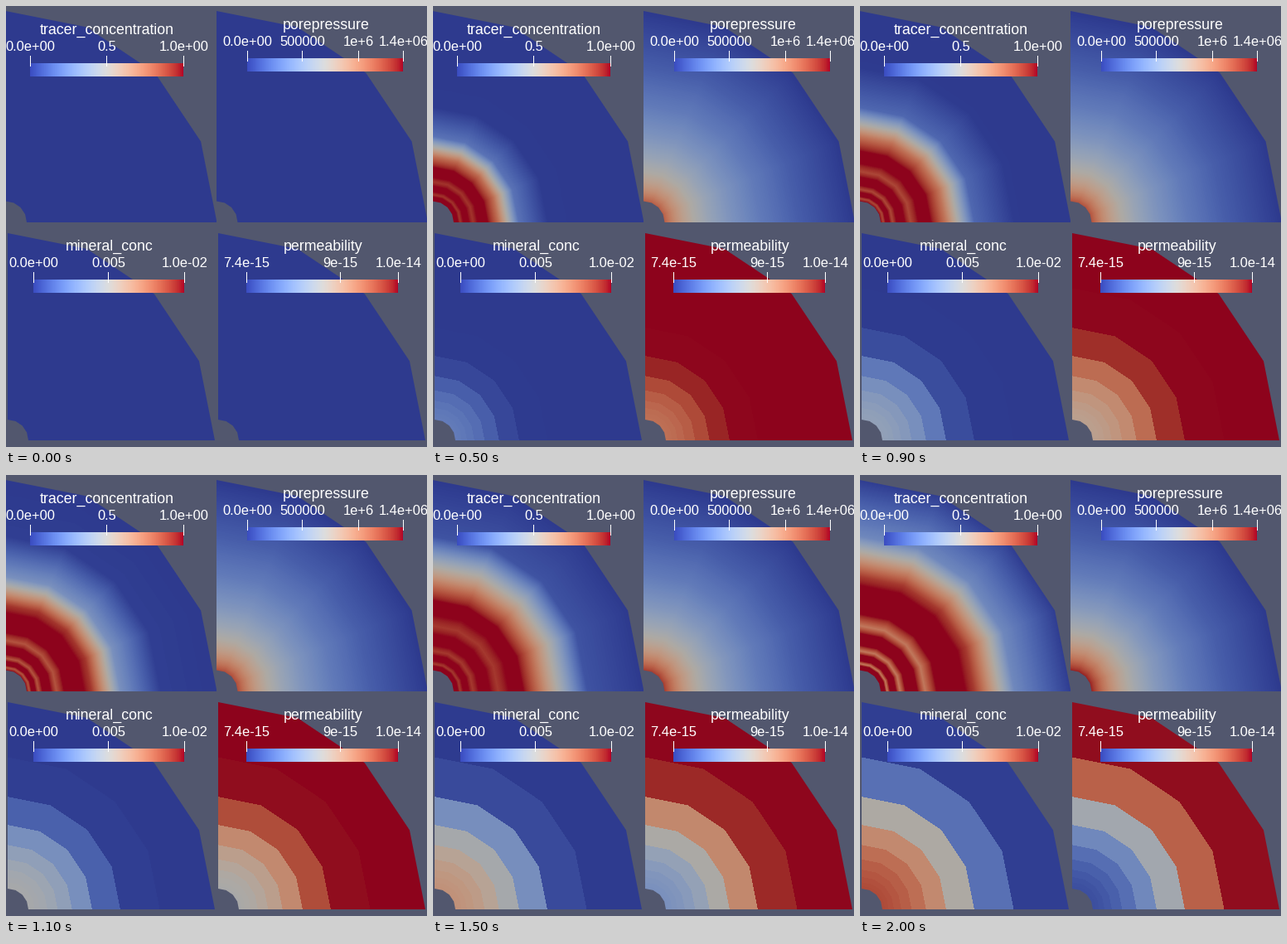
A matplotlib script for the animation above (2.1 s loop, 508 px wide and 532 px high).

```python
import numpy as np
import matplotlib.pyplot as plt
from matplotlib.animation import FuncAnimation

W, H, DPI = 508, 532, 100
FRAMES, INTERVAL = 21, 100
BACK = np.array([82, 87, 110]) / 255
LIGHT = np.array([.785, .768, .742])  # slightly warm lamp
CMAP = plt.get_cmap("coolwarm")

# Ring radii of the mesh, growing by 1.4 from the hole to the rim (rim = 1)
RINGS = 10
NODE = np.arange(RINGS + 1)
EDGES = 0.1 + 0.9 * (1.4 ** NODE - 1) / (1.4 ** RINGS - 1)
MID = (EDGES[1:] + EDGES[:-1]) / 2


def tracer(t):
    # A front whose swept area grows steadily
    front = np.sqrt(0.018 + 0.0208 * t)
    s = EDGES / front - 1
    v = 1.2 / (1 + np.exp(8.5 * (s + 0.04)))
    # Behind it, neighbouring nodes swing against each other
    swing = 0.013 * t * np.tanh(2.5 * np.cos(2 * np.pi * (t - 11) / 14.5))
    behind = np.clip((-s - 0.3) / 0.15, 0, 1)
    v += behind * (0.99 + swing * (-1.0) ** NODE - v)
    v[0] = 1
    return v


def mineral(t):
    # Steady growth with a soft start, later for outer rings
    onset = 47.4 * MID ** 2.3
    soft = 0.3 + 0.14 * onset
    return 0.044 * soft * np.log1p(np.exp((t - onset) / soft))


def permeability(t):
    m = mineral(t)
    return 1 - 1.13 * m + 0.06 * m ** 2


def pressure(t):
    # Steady radial flow: each ring adds its own resistance
    k = 0.74 + 0.26 * permeability(t)
    drop = np.diff(np.log(EDGES)) / k / np.log(10)
    p = np.append(np.cumsum(drop[::-1])[::-1], 0)
    return 0.8 * (1 - np.exp(-1.3 * t)) * p


class Panel:
    def __init__(self, box, centre, radius, values, smooth):
        x0, y0, x1, y1 = box
        self.area = np.s_[y0:y1, x0:x1]
        self.values, self.smooth = values, smooth
        y, x = np.mgrid[y0:y1, x0:x1] + 0.5
        x, y = x - centre[0], centre[1] - y
        # Polygonal radius: constant along the straight side of each sector
        step = np.pi / 8
        off = np.mod(np.arctan2(y, x), step) - step / 2
        s = np.hypot(x, y) * np.cos(off) / np.cos(step / 2)
        cover = np.clip(radius - s + .5, 0, 1) * np.clip(s - radius / 10 + .5, 0, 1)
        self.cover = (cover * (x >= 0) * (y >= 0))[..., None]
        self.rho = s / radius
        self.cell = np.clip(np.searchsorted(EDGES, self.rho) - 1, 0, RINGS - 1)

    def paint(self, img, t):
        v = self.values(t) * (t > 0)  # every field starts out empty
        field = np.interp(self.rho, EDGES, v) if self.smooth else v[self.cell]
        rgb = CMAP(np.clip(field, 0, 1))[..., :3] * LIGHT
        img[self.area] = BACK + (rgb - BACK) * self.cover


PANELS = [
    Panel((0, 0, 254, 261), (-.5, 261), 255, tracer, True),
    Panel((254, 0, W, 261), (254, 261), 255, pressure, True),
    Panel((0, 261, 254, H), (2, 524), 250, mineral, False),
    Panel((254, 261, W, H), (256, 524), 250, permeability, False),
]

fig = plt.figure(figsize=(W / DPI, H / DPI), dpi=DPI, facecolor=BACK)
ax = fig.add_axes([0, 0, 1, 1])
ax.axis("off")


def label(x, y, text, px):
    ax.text(x, y, text, color="white", family="Liberation Sans",
            size=px * 72 / DPI, ha="center", va="baseline", zorder=4)


def legend(title, title_x, left, right, top, ticks):
    ax.imshow(np.linspace(0, 1, 256)[None], cmap=CMAP, aspect="auto",
              extent=(left, right, top + 16, top), interpolation="nearest", zorder=2)
    label(title_x, top - 35, title, 17.7)
    for x, text in ticks:
        ax.plot([x, x], [top - 9, top + 4], color="white", lw=0.72,
                solid_capstyle="butt", snap=False, zorder=3)
        label(x, top - 15, text, 16.5)


canvas = np.empty((H, W, 3))
canvas[:] = BACK
view = ax.imshow(canvas, extent=(0, W, H, 0), aspect="auto", interpolation="nearest")

legend("tracer_concentration", 122, 29, 214, 69,
       [(29.5, "0.0e+00"), (121.5, "0.5"), (214.5, "1.0e+00")])
legend("porepressure", 386, 291, 479, 63,
       [(291.5, "0.0e+00"), (357.5, "500000"), (425.5, "1e+6"), (479.5, "1.4e+06")])
legend("mineral_conc", 124.5, 33, 215, 330,
       [(33.5, "0.0e+00"), (123.5, "0.005"), (215.5, "1.0e-02")])
legend("permeability", 382.5, 290, 473, 330,
       [(290.5, "7.4e-15"), (403.5, "9e-15"), (473.5, "1.0e-14")])

ax.set_xlim(0, W)
ax.set_ylim(H, 0)


def draw(t):
    for panel in PANELS:
        panel.paint(canvas, t)
    view.set_data(canvas)
    return [view]


anim = FuncAnimation(fig, draw, frames=FRAMES, interval=INTERVAL, repeat=True)
plt.show()
```
